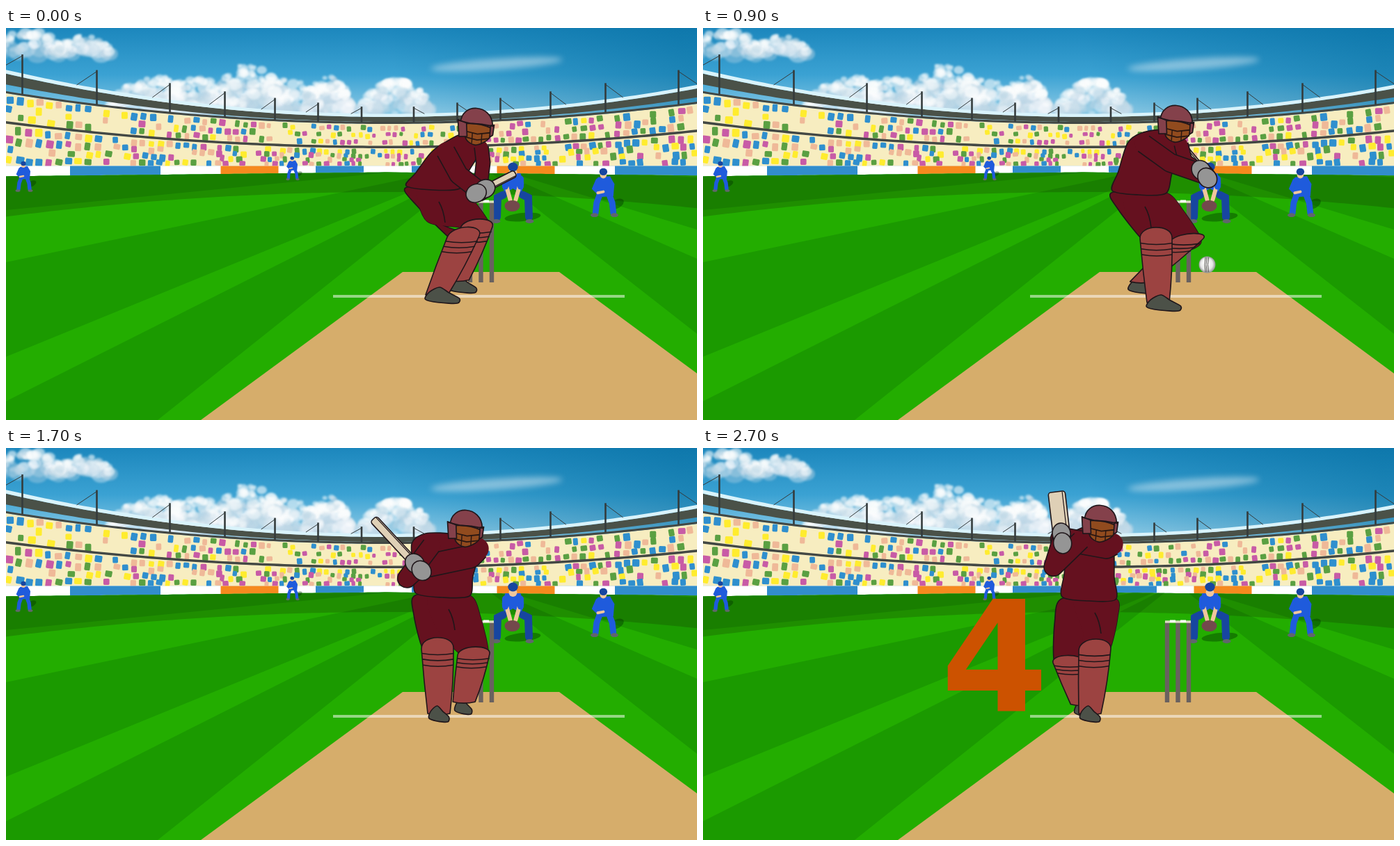
These frames come from a looping animation (993 px wide and 564 px high, 2800 ms). An HTML page with a canvas:

```html
<!DOCTYPE html>
<html lang="en">
<head>
<meta charset="utf-8">
<title>Cricket stroke</title>
<style>
  html, body { margin: 0; width: 993px; height: 564px; overflow: hidden; }
  canvas, svg { position: absolute; left: 0; top: 0; display: block; }
  text { font: 700 222px "DejaVu Sans", sans-serif; fill: #cc5200; text-anchor: middle; }
</style>
</head>
<body>
<canvas id="stage" width="993" height="564"></canvas>
<svg width="993" height="564"><text id="score" x="0" y="81">4</text></svg>
<script>
const W = 993, H = 564, MID = 548.5, LOOP = 2800, STEP = 100;
const INK = '#20161a', KIT = '#65111f', PAD = '#9c4341', SHOE = '#4c5148', GLOVE = '#959595', HELMET = '#84414b';
const BLUE = '#1f5bdc', NAVY = '#1746a0', SKIN = '#efc79c', GREY = '#60666c', SHADE = 'rgba(0,50,0,.4)';
const stage = document.getElementById('stage').getContext('2d');
const score = document.getElementById('score');
let c = stage;

let seed = 11;
const rnd = () => (seed = (seed * 16807) % 2147483647) / 2147483647;
const mix = (a, b, u) => a + (b - a) * u;
const between = (p, q, u) => [mix(p[0], q[0], u), mix(p[1], q[1], u)];
const shift = (p, x, y) => [p[0] + x, p[1] + y];
const dist = (p, q) => Math.hypot(q[0] - p[0], q[1] - p[1]);

function trace(p, close = true) {
  c.beginPath();
  for (let i = 0; i < p.length; i += 2) c.lineTo(p[i], p[i + 1]);
  if (close) c.closePath();
}
function poly(color, ...p) { trace(p); c.fillStyle = color; c.fill(); }
function oval(color, x, y, rx, ry = rx, a = 0) {
  c.beginPath();
  c.ellipse(x, y, rx, ry, a, 0, 7);
  c.fillStyle = color;
  c.fill();
}
function line(color, width, ...p) {
  trace(p, false);
  c.strokeStyle = color;
  c.lineWidth = width;
  c.stroke();
}
function ink(fill) {
  c.fillStyle = fill;
  c.fill();
  c.strokeStyle = INK;
  c.lineWidth = 1.6;
  c.stroke();
}

// closed smooth curve through the points
function smooth(pts) {
  const n = pts.length, at = i => pts[(i + n) % n], k = 0.14;
  c.beginPath();
  c.moveTo(...pts[0]);
  for (let i = 0; i < n; i++) {
    const [a, b, d, e] = [at(i - 1), at(i), at(i + 1), at(i + 2)];
    c.bezierCurveTo(b[0] + (d[0] - a[0]) * k, b[1] + (d[1] - a[1]) * k,
      d[0] - (e[0] - b[0]) * k, d[1] - (e[1] - b[1]) * k, ...d);
  }
  c.closePath();
}

// ---------- scenery ----------
const off = x => Math.abs(x - MID) / 560;
const arc = (mid, rise) => x => mid - rise * off(x) ** 2;

function band(color, top, bottom, x0 = 0, x1 = W) {
  c.beginPath();
  for (let x = x0; x < x1; x += 8) c.lineTo(x, top(x));
  c.lineTo(x1, top(x1));
  for (let x = x1; x > x0; x -= 8) c.lineTo(x, bottom(x));
  c.lineTo(x0, bottom(x0));
  c.fillStyle = color;
  c.fill();
}

// humps: centre, height, half width
function cloud(base, humps, count) {
  for (let i = 0; i < count; i++) {
    const [x, h, w] = humps[i % humps.length], dx = rnd() * 2 - 1;
    const u = rnd() ** 0.7, r = mix(3, 12, rnd()) * (1.1 - 0.5 * u);
    const y = base - (h * Math.sqrt(1 - dx * dx * 0.9) - r) * u;
    c.globalAlpha = mix(0.35, 0.6, u);
    oval(rnd() < 0.75 * u + 0.2 ? '#fcfdfe' : '#bed7e6', x + dx * w, y, r * 1.25, r);
  }
  c.globalAlpha = 1;
}

function sky() {
  let g = c.createLinearGradient(0, 0, 0, 135);
  g.addColorStop(0, '#1c87bd');
  g.addColorStop(0.5, '#3ba2d3');
  g.addColorStop(1, '#9dd3ea');
  c.fillStyle = g;
  c.fillRect(0, 0, W, 215);
  g = c.createLinearGradient(560, 80, 960, -20);
  g.addColorStop(0, 'rgba(0,105,155,0)');
  g.addColorStop(1, 'rgba(0,105,155,.5)');
  c.fillStyle = g;
  c.fillRect(0, 0, W, 215);
  c.filter = 'blur(1.6px)';
  cloud(124, [[215, 58, 65], [345, 74, 62], [275, 56, 60], [395, 55, 60], [462, 58, 34], [560, 54, 50]], 720);
  cloud(40, [[35, 44, 45], [110, 32, 42]], 120);
  c.filter = 'blur(4px)';
  c.globalAlpha = 0.5;
  oval('#dcecf4', 705, 52, 95, 8, -0.07);
  c.globalAlpha = 1;
  c.filter = 'none';
}

function crowd(top, bottom, rows, keep) {
  const hues = ['#ffec2e', '#c85ba6', '#2f8fce', '#5aa042', '#efb998'];
  for (let r = 0; r < rows; r++) {
    for (let x = rnd() * 8; x < W;) {
      const s = mix(6.5, 10.5, off(x));
      if (rnd() < keep) {
        c.save();
        c.translate(x, mix(top(x), bottom(x), (r + 0.5 + (rnd() - 0.5) * 0.3) / rows));
        c.rotate((x - MID) / 560 * -0.1 + (rnd() - 0.5) * 0.25);
        c.beginPath();
        c.roundRect(-s / 2, -s / 2, s * (0.75 + rnd() * 0.4), s * (0.85 + rnd() * 0.4), 1.6);
        c.fillStyle = hues[Math.floor(rnd() * 5)];
        c.fill();
        c.restore();
      }
      x += s * 1.3 + rnd() * 2;
    }
  }
}

function stand() {
  const seats = arc(138, 46), rail = arc(171, 37), foot = () => 198.5, wall = x => 207.5 + 6 * off(x);
  band('#f7edc0', seats, foot);
  crowd(x => seats(x) + 1, x => rail(x) - 1, 3, 0.72);
  crowd(x => rail(x) + 4, foot, 4, 0.66);
  band('#434844', x => rail(x) - 1.5, x => rail(x) + 2);
  band('#434844', x => seats(x) - 3, seats);
  band('#4a5148', arc(128, 65), arc(135, 56));
  band('#d9f3fb', arc(123.5, 66), arc(128, 65));
  for (const side of [-1, 1]) {
    for (const d of [37.5, 100, 162, 234, 313, 418, 525]) {
      const x = MID + side * d, y = seats(x) - 22 - 40 * off(x), end = x + side * mix(14, 34, off(x));
      line('#343b3c', 2.6, x, y, x, seats(x) - 2);
      line('#343b3c', 1, x, y + 2, end, arc(124, 66)(end));
    }
  }
  band('#fff', foot, wall);
  const boards = [['#328dcc', 34.5, 103.5], ['#f68a1e', 157, 240], ['#328dcc', 326.5, 456.5]];
  for (const [color, a, b] of boards) {
    band(color, foot, wall, MID - b, MID - a);
    band(color, foot, wall, MID + a, Math.min(W, MID + b));
  }
  return wall;
}

function field(edge) {
  c.save();
  c.beginPath();
  c.moveTo(W, H);
  c.lineTo(0, H);
  for (let x = 0; x <= W + 8; x += 8) c.lineTo(x, edge(x));
  c.clip();
  c.fillStyle = '#23ad00';
  c.fillRect(0, 190, W, H);
  const dark = (...p) => poly('#1b9a00', 680, 195, ...p);
  dark(0, 210, 0, 262);
  dark(0, 337, 0, 473);
  dark(0, 537, 0, H, 218, H);
  dark(W, 332, W, 440);
  dark(W, 215, W, 290);
  band('rgba(20,45,0,.24)', () => 200, arc(236, -37));
  c.restore();
  poly('#d6ad6b', 570, 351, 795, 351, W, 497, W, H, 280, H);
  c.fillStyle = 'rgba(255,255,255,.52)';
  c.fillRect(470, 384, 419, 4);
}

function fielder(x, y, s) {
  c.save();
  c.translate(x, y);
  c.scale(s, s);
  c.lineCap = 'round';
  oval(SHADE, 11, 32, 7, 4, -0.5);
  for (const side of [-1, 1]) {
    line(BLUE, 5.5, side * 4, 23, side * 7, 31, side * 8, 40);
    oval(GREY, side * 9, 42, 3.5, 1.8);
  }
  poly(BLUE, -6, 8, 5, 7, 9, 14, 8, 25, -7, 26, -8, 17);
  line(BLUE, 4, -6, 11, -9, 18, -6, 21);
  line(SKIN, 2.5, -6, 22, -1, 21);
  oval(SKIN, -1, 6, 3);
  oval(NAVY, -1, 3, 3.6, 3.2);
  c.restore();
}

function keeper() {
  c.save();
  c.translate(728.5, 200);
  c.lineCap = 'round';
  oval(SHADE, 14, 72, 26, 6, -0.1);
  poly(BLUE, -11, 9, 11, 9, 16, 24, 12, 38, 0, 31, -12, 38, -16, 24);
  for (const side of [-1, 1]) {
    line(NAVY, 11, side * 14, 40, side * 22, 44, side * 23, 72);
    oval(GREY, side * 24, 78, 6, 3);
    line(SKIN, 6, side * 9, 29, side * 4, 47);
    line(BLUE, 9, side * 11, 17, side * 11, 28);
  }
  oval('#73494c', -1, 56, 11, 8);
  oval(SKIN, 0, 8, 6);
  oval(NAVY, 0, 0, 7.2, 6.5);
  c.restore();
}

function stumps() {
  for (const x of [667, 682.5, 698]) line('#69615f', 6.4, x, 250, x, 366);
  line('rgba(232,232,205,.9)', 3.5, 664, 250, 701, 250);
  for (const x of [671, 686]) line('#fff', 3, x, 249, x + 8, 249);
}

// ---------- batter ----------
// each row: time, then x, y of the joints in this order
const JOINTS = ['head', 'back', 'waist', 'kneeA', 'kneeB', 'footA', 'footB', 'hand', 'tip'];
const poses = [
  [0, 675, 143, 610, 180, 613, 230, 657, 301, 676, 288, 627, 396, 655, 381, 681, 235, 732, 209],
  [500, 684, 141, 606, 152, 624, 227, 656, 294, 694, 298, 660, 398, 632, 382, 699, 184, 674, 66],
  [900, 679, 139, 610, 166, 626, 237, 651, 303, 695, 306, 662, 407, 632, 382, 721, 211, 684, 166],
  [1200, 668, 137, 600, 148, 623, 229, 633, 300, 682, 309, 660, 407, 650, 389, 705, 211, 821, 267],
  [1700, 660, 117, 583, 138, 627, 212, 620, 289, 672, 298, 622, 394, 657, 383, 593, 172, 528, 102],
  [2000, 597, 116, 548, 124, 572, 218, 531, 307, 614, 310, 549, 387, 654, 382, 528, 118, 547, 85],
  [2400, 570, 110, 524, 130, 554, 217, 563, 291, 526, 309, 556, 394, 546, 386, 516, 131, 508, 63]
];

function along(keys, t) {
  const i = Math.min(keys.length - 1, Math.max(1, keys.findIndex(k => k[0] > t) + (t >= keys.at(-1)[0] ? keys.length : 0)));
  const a = keys[i - 1], b = keys[i], u = Math.min(1, (t - a[0]) / (b[0] - a[0]));
  return a.map((v, j) => mix(v, b[j], u));
}

function leg(wx, wy, side, knee) {
  const top = [wx + side * 39, wy], low = shift(knee, side * 21, 0);
  const hip = shift(between(top, low, 0.36), side * 6, 0);
  return [top, hip, low, shift(knee, 0, 14), shift(knee, side * -18, 0), [wx - side * 8, wy + 48], [wx - side * 20, wy]];
}

function trousers([wx, wy], a, b) {
  const [left, right] = a[0] < b[0] ? [a, b] : [b, a];
  const legs = [leg(wx, wy, 1, right), leg(wx, wy, -1, left)];
  for (const p of legs) { smooth(p); ink(KIT); }
  smooth(legs[0]);
  c.fill();
  c.beginPath();
  c.moveTo(wx + 9, wy + 20);
  c.quadraticCurveTo(wx + 16, wy + 32, wx + 18, wy + 50);
  c.stroke();
}

function pad([kx, ky], [ax, ay]) {
  const w = 23, v = 16, dx = (kx - ax) * 0.2, dy = (ky - ay) * 0.23;
  c.beginPath();
  c.moveTo(kx - w, ky);
  c.bezierCurveTo(kx - w + dx, ky + dy, kx + w + dx, ky + dy, kx + w, ky - 2);
  c.quadraticCurveTo((kx + ax + w + v) / 2 + 3, (ky + ay) / 2, ax + v, ay);
  c.quadraticCurveTo(ax, ay + 4, ax - v, ay);
  c.quadraticCurveTo((kx + ax - w - v) / 2 - 1, (ky + ay) / 2, kx - w, ky);
  ink(PAD);
  for (const u of [0.07, 0.16, 0.25]) {
    const x = mix(kx, ax, u), y = mix(ky, ay, u), half = mix(w, v, u);
    c.beginPath();
    c.moveTo(x - half, y);
    c.quadraticCurveTo(x, y + 4, x + half + 1, y);
    c.stroke();
  }
}

function shoe([x, y], w) {
  const l = x - w / 2, at = (u, h) => [l + w * u, y - 23 * h];
  smooth([at(0, 0.25), at(0.12, 0.7), at(0.42, 1), at(0.7, 0.65), at(1, 0.3), at(0.94, 0), at(0.4, 0.04)]);
  ink(SHOE);
}

function arm(shoulder, elbow, wrist, w) {
  const p = [...shoulder, ...elbow, ...wrist];
  c.lineJoin = 'round';
  line(INK, w + 1.6, ...p);
  oval(INK, ...wrist, w / 2 + 0.8);
  c.lineCap = 'round';
  line(KIT, w - 1.6, ...p);
  c.lineCap = 'butt';
}

// a turned blade shows its full face only when upright
function bat(hand, tip) {
  const len = dist(hand, tip), face = 10 + 15 * (Math.abs(tip[1] - hand[1]) / len) ** 6;
  c.save();
  c.translate(...hand);
  c.rotate(Math.atan2(tip[1] - hand[1], tip[0] - hand[0]));
  c.beginPath();
  c.roundRect(0, -face / 2, len, face, [0, 4, 4, 0]);
  ink('#dfd0b6');
  line(INK, 1.2, 0, face * 0.33, len - 1, face * 0.33);
  c.restore();
}

function gloves([x, y], tip) {
  const a = Math.atan2(tip[1] - y, tip[0] - x);
  for (const d of [8, -6]) {
    c.beginPath();
    c.ellipse(x + Math.cos(a) * d, y + Math.sin(a) * d, 15, 13, a, 0, 7);
    ink(GLOVE);
  }
}

function head([x, y]) {
  const cage = '#2a1712';
  c.save();
  c.translate(x, y);
  c.rotate(0.07);
  c.scale(1.05, 1.05);
  smooth([[-15, -4], [20, -3], [20, 12], [12, 20], [0, 24], [-12, 17]]);
  ink('#914b1e');
  for (const h of [6, 14]) line(cage, 1.7, -14, h, 3, h + 3, 20, h);
  for (const v of [-4, 9]) line(cage, 1.4, v, 7, v, 22);
  c.beginPath();
  c.moveTo(-21, -5);
  c.bezierCurveTo(-22, -33, 20, -34, 23, -4);
  c.lineTo(23, 0);
  c.quadraticCurveTo(2, -8, -21, -3);
  c.closePath();
  ink(HELMET);
  trace([-25, -9, -13, -5, -11, 13, -22, 14]);
  ink(HELMET);
  trace([20, -4, 25, -5, 24, 9, 20, 12]);
  ink(HELMET);
  line(INK, 1.6, -25, -8, -8, -5, 8, -5, 25, -3);
  c.restore();
}

function batter(t) {
  const row = along(poses, t > 1700 && t < 2000 ? Math.max(1700, 3 * t / 2 - 1000) : t), p = {};
  JOINTS.forEach((name, i) => p[name] = row.slice(1 + i * 2, 3 + i * 2));
  const { back, waist, hand, tip } = p;
  const turn = Math.min(1, Math.max(0, (t - 1200) / 500));
  const size = mix(49, 29, turn);
  const front = shift(p.head, mix(8, 18, turn), 28), start = between(back, front, 0.3);
  const slack = from => Math.max(0, 70 - dist(from, hand)) * 0.8;
  const ankle = foot => shift(foot, (29 - size) * 0.4, -12);

  if (t < 1000) bat(hand, tip);
  shoe(p.footB, size * 0.85);
  trousers(waist, p.kneeA, p.kneeB);
  pad(p.kneeB, between(p.kneeB, ankle(p.footB), 0.92));
  pad(p.kneeA, ankle(p.footA));
  shoe(p.footA, size);

  const left = shift(waist, -38, -3), right = shift(waist, 39, 1);
  smooth([shift(p.head, -14, 8), shift(back, 20, -15), back, between(back, left, 0.6), left,
    shift(waist, 0, 3), right, between(front, right, 0.6), front]);
  ink(KIT);
  const drop = slack(front);
  arm(front, shift(between(front, hand, 0.2), 6 - drop * 0.6, 6 + drop * 0.8), hand, mix(20, 33, turn));
  arm(start, shift(between(start, hand, 0.5), -20 * turn - 6, 5 + slack(start)), hand, 27);
  head(p.head);
  if (t >= 1000) bat(hand, tip);
  gloves(hand, tip);
}

// ---------- ball ----------
// time, x, y, radius: delivery, bounce, contact, away
const flight = [[100, 168, 258, 31], [600, 652, 428, 18], [1200, 797, 253, 6], [1500, 1050, 130, 9]];

function ball(t) {
  if (t < 100 || t >= 1500) return;
  const [, x, y, r] = along(flight, t);
  c.save();
  c.translate(x, y);
  c.scale(r, r);
  const g = c.createRadialGradient(-0.2, -0.25, 0.2, 0, 0, 1);
  g.addColorStop(0, '#fff');
  g.addColorStop(0.65, '#e6e6e6');
  g.addColorStop(1, '#8e9090');
  oval(g, 0, 0, 1);
  for (const s of [-0.28, -0.1, 0.1]) {
    c.beginPath();
    c.moveTo(s + 0.08, -0.9);
    c.quadraticCurveTo(s - 0.12, 0, s + 0.08, 0.9);
    c.strokeStyle = '#3a3733';
    c.lineWidth = 0.07;
    c.stroke();
  }
  c.restore();
}

// ---------- run ----------
const scene = document.createElement('canvas');
scene.width = W;
scene.height = H;
c = scene.getContext('2d');
sky();
field(stand());
fielder(26, 192, 1);
fielder(412, 185, 0.78);
fielder(860, 202, 1.6);
keeper();
stumps();
c = stage;

function draw(now) {
  const t = Math.floor((now % LOOP) / STEP) * STEP;
  c.drawImage(scene, 0, 0);
  batter(t);
  ball(t);
  const s = Math.max(0, (t - 2000) / 700);
  score.setAttribute('transform', `translate(419 297) scale(${s})`);
}
const start = performance.now();
function tick() {
  draw(performance.now() - start);
  requestAnimationFrame(tick);
}
tick();
</script>
</body>
</html>
```
